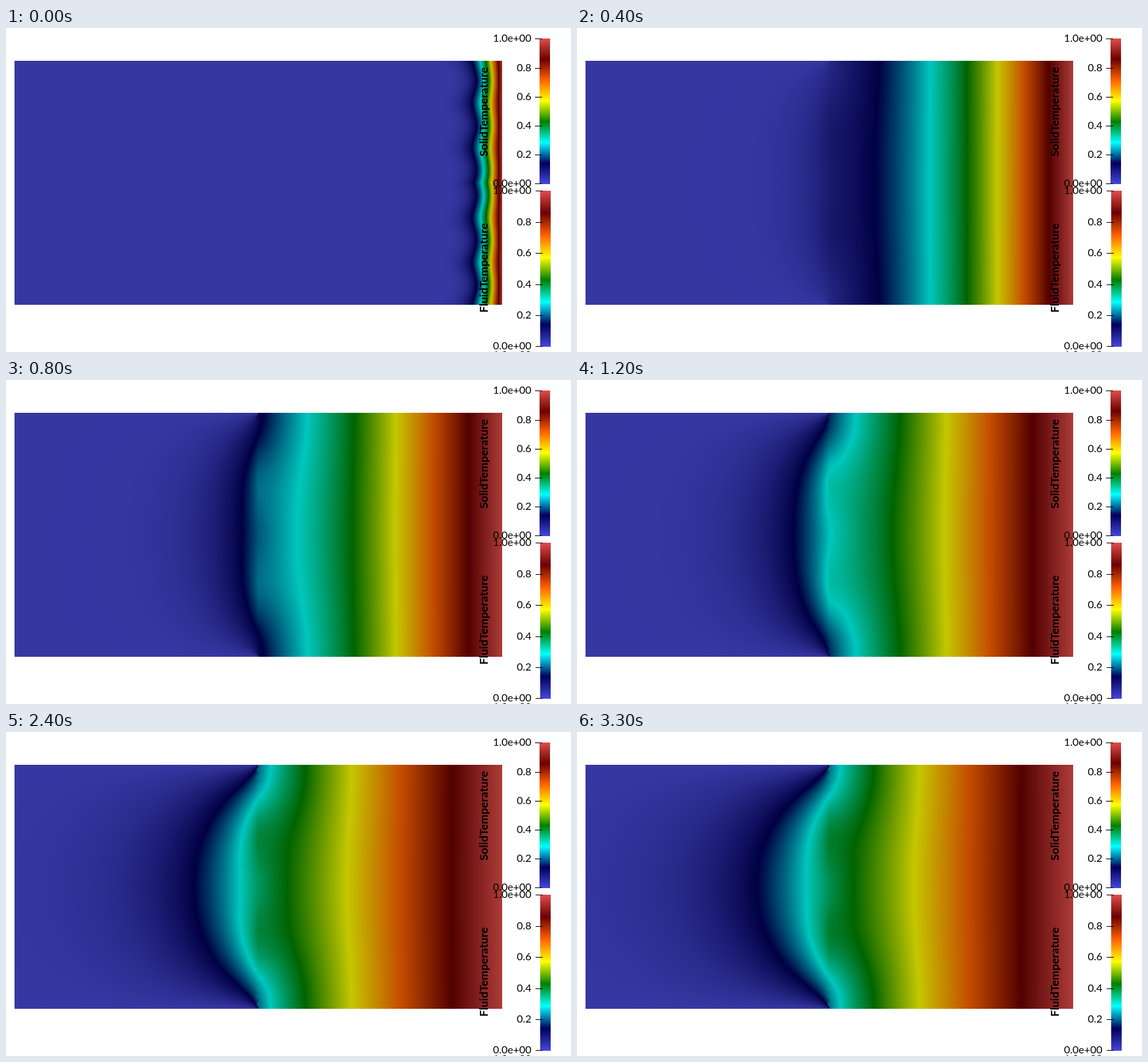
An HTML page with a canvas that plays this animation: 862 by 494 pixels, repeating every 3400 ms.

```html
<!DOCTYPE html>
<html lang="en">
<head>
<meta charset="utf-8">
<title>Heat conduction</title>
<style>
html, body { margin: 0; width: 100%; height: 100%; overflow: hidden; background: #fff; }
canvas, svg { position: absolute; left: 0; top: 0; }
canvas { left: 13px; top: 50px; }
text { font: 16px Lato, "Open Sans", sans-serif; }
.title { font-size: 17.4px; font-weight: bold; }
</style>
</head>
<body>
<canvas id="field" width="744" height="372"></canvas>
<svg id="legend" width="862" height="494"></svg>
<script>
const W = 744, H = 372, HALF = 186, WALL = 372;
const STEP = 100, LOOP = 3400;
const STOPS = [[71, 71, 219], [0, 0, 91], [0, 255, 255], [0, 128, 0],
  [255, 255, 0], [255, 97, 0], [107, 0, 0], [224, 77, 77]];

const REACH = 562;                                     // where the steady slope falls to zero
const SPREAD = 5150;                                   // diffusivity, px² per step
const RATE = SPREAD * (Math.PI / REACH) ** 2;
const SHAPE = [1, .22, -.13];                          // cosine modes along the interface
const MODES = 30;

const { PI, exp, cos, sin, floor } = Math;
const lerp = (a, b, u) => a + (b - a) * u;
const range = (n, f) => Array.from({ length: n }, (_, i) => f(i));

// Colours of the lit surface, packed as ABGR
const SHADES = 1400;
const lit = STOPS.map(([r, g, b]) => [r * .77, g * .78, b * .74]);
const palette = Uint32Array.from(range(SHADES + 1, n => {
  const v = n / SHADES * 7, i = Math.min(6, floor(v));
  const [r, g, b] = lit[i].map((c, k) => Math.round(lerp(c, lit[i + 1][k], v - i)));
  return (255 << 24 | b << 16 | g << 8 | r) >>> 0;
}));

// Distance from the centre line, 0 to 1, for the mirrored half rows
const rows = range(HALF, y => (y + .5) / HALF);

// Cold-wall modes of the fluid, fitted to the interface shape
const waves = range(MODES, j => {
  const mu = (j + .5) * PI;
  const weight = 2 * mu * sin(mu) * SHAPE.reduce((sum, a, i) =>
    sum + a * cos(i * PI) / (mu * mu - (i * PI) ** 2), 0);
  return { mu, weight, rows: rows.map(d => cos(mu * d)) };
});

// Rod heated at one end, u pixels from the hot side
function rod(u, n) {
  let heat = 1 - u / REACH;
  for (let m = 1; m <= MODES; m++)
    heat -= 2 / (m * PI) * sin(m * PI * u / REACH) * exp(-m * m * RATE * n);
  return heat;
}

const ctx = field.getContext("2d");
const image = ctx.createImageData(W, H);
const pixels = new Uint32Array(image.data.buffer);

function plot(x, row, heat) {
  const colour = palette[Math.round(Math.max(0, Math.min(1, heat)) * SHADES)];
  pixels[(HALF + row) * W + x] = pixels[(HALF - 1 - row) * W + x] = colour;
}

function drawField(frame) {
  const n = frame + .08;
  const profile = range(430, u => rod(u, n));
  const contact = Math.max(0, profile[W - WALL]);
  const ripple = .08 * exp(-4 * frame);
  const drag = .001 + .02 * exp(-.11 * n);

  for (let x = 0; x < W; x++) {
    const s = Math.abs(x + .5 - WALL);
    if (x < WALL) {
      const fade = contact * exp(-s * drag - s * s / (2 * SPREAD * n));
      const parts = waves.map(w => fade * w.weight * exp(-s * w.mu / HALF));
      for (let row = 0; row < HALF; row++) {
        let heat = 0;
        for (let j = 0; j < MODES; j++) heat += parts[j] * waves[j].rows[row];
        plot(x, row, heat);
      }
    } else {
      const bends = SHAPE.map((a, i) => contact * a * exp(-i * PI * s / HALF));
      rows.forEach((d, row) => {
        const u = (W - x - .5) * (1 - ripple * cos(2 * PI * (row - 53) / 68));
        const i = floor(u);
        plot(x, row, lerp(profile[i], profile[i + 1], u - i)
          + bends[1] * cos(PI * d) + bends[2] * cos(2 * PI * d));
      });
    }
  }
  ctx.putImageData(image, 0, 0);
}

function bar(x, top, bottom, name, nameY) {
  const id = "ramp" + top;
  const stops = STOPS.map((c, i) =>
    `<stop offset="${1 - i / 7}" stop-color="rgb(${c})"/>`).reverse().join("");
  let out = `<linearGradient id="${id}" x2="0" y2="1">${stops}</linearGradient>
    <rect x="${x}" y="${top}" width="16" height="${bottom - top}" fill="url(#${id})"/>`;
  ["1.0e+00", "0.8", "0.6", "0.4", "0.2", "0.0e+00"].forEach((label, i) => {
    const y = Math.ceil(lerp(top, bottom - 1, i / 5));
    out += `<rect x="${x - 7}" y="${y}" width="11" height="1"/>
      <text x="801.5" y="${y + 5}" text-anchor="end">${label}</text>`;
  });
  return out + `<text class="title" transform="translate(735 ${nameY}) rotate(-90)">${name}</text>`;
}

legend.innerHTML = bar(814, 16, 238, "SolidTemperature", 196)
  + bar(815, 248, 486, "FluidTemperature", 434)
  + `<text x="801.5" y="504" text-anchor="end">1.0e+00</text>`;

let shown = -1;
function tick() {
  const frame = floor(performance.now() % LOOP / STEP);
  if (frame !== shown) drawField(shown = frame);
  requestAnimationFrame(tick);
}
tick();
</script>
</body>
</html>
```
